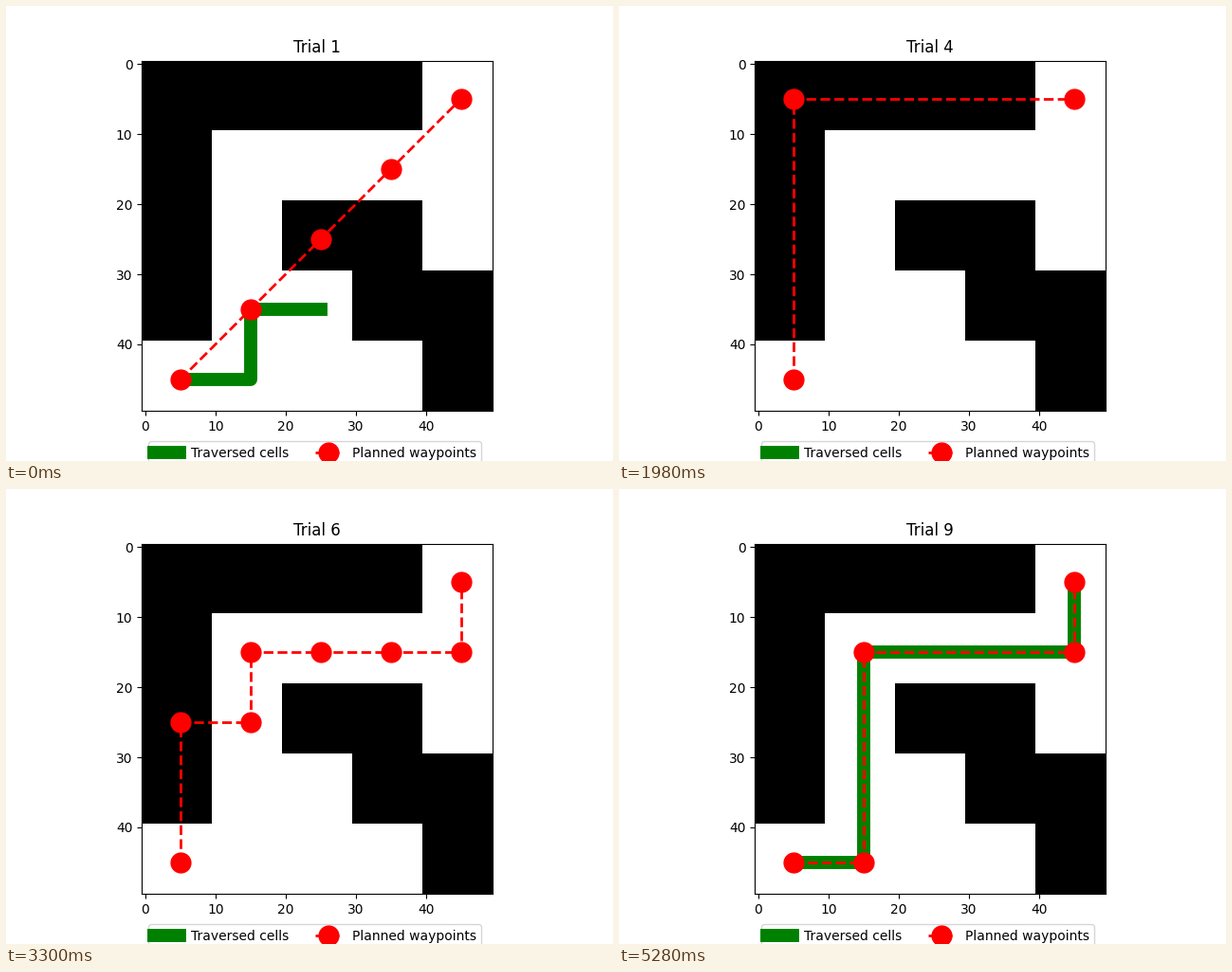
A matplotlib script for the animation above (5.94 s loop, 640x480 px).

```python
import numpy as np
import matplotlib.pyplot as plt
from matplotlib.animation import FuncAnimation

CELL = 10
MAZE = ["#### ",
        "#    ",
        "# ## ",
        "#  ##",
        "    #"]
START, GOAL = (0, 4), (4, 0)

# Waypoints (column, row) tried between start and goal, one list per trial.
diagonal = [(c, 4 - c) for c in range(5)]
corridor = [(c, 1) for c in range(5)]
VIAS = [
    diagonal[1:4],
    [(2, 3), corridor[4]],
    [(4, 4)],
    [(0, 0)],
    [corridor[0], corridor[4]],
    [(0, 2), (1, 2)] + corridor[1:],
    [(1, 4), (1, 0)],
    [(3, 4), corridor[3]],
    [(1, 4), corridor[1], corridor[4]],
]


def drive(route):
    """Follow the route, columns first, until a wall stops the way."""
    col, row = route[0]
    track = [(col, row)]
    for goal_col, goal_row in route[1:]:
        while (col, row) != (goal_col, goal_row):
            if col != goal_col:
                col += 1 if goal_col > col else -1
            else:
                row += 1 if goal_row > row else -1
            if MAZE[row][col] == "#":
                return track
            track.append((col, row))
    return track


def centres(cells):
    """Coordinates of the cell centres as x and y rows."""
    return np.array(cells).T * CELL + CELL / 2


fig, ax = plt.subplots(figsize=(6.4, 4.8), dpi=100)
free = np.array([[c != "#" for c in line] for line in MAZE], float)
ax.imshow(np.kron(free, np.ones((CELL, CELL))), cmap="gray", vmin=0, vmax=1)
driven, = ax.plot([], [], color="green", linewidth=10, label="Traversed cells")
planned, = ax.plot([], [], "o--", color="red", linewidth=2, markersize=15,
                   label="Planned waypoints")
title = ax.set_title("")
ax.legend(loc="center left", bbox_to_anchor=(0, -0.12), ncol=2)


def draw(i):
    route = [START, *VIAS[i], GOAL]
    planned.set_data(*centres(route))
    driven.set_data(*centres(drive(route)))
    title.set_text(f"Trial {i + 1}")
    return driven, planned, title


anim = FuncAnimation(fig, draw, frames=len(VIAS), interval=660,
                     repeat=True, repeat_delay=0)
plt.show()
```
